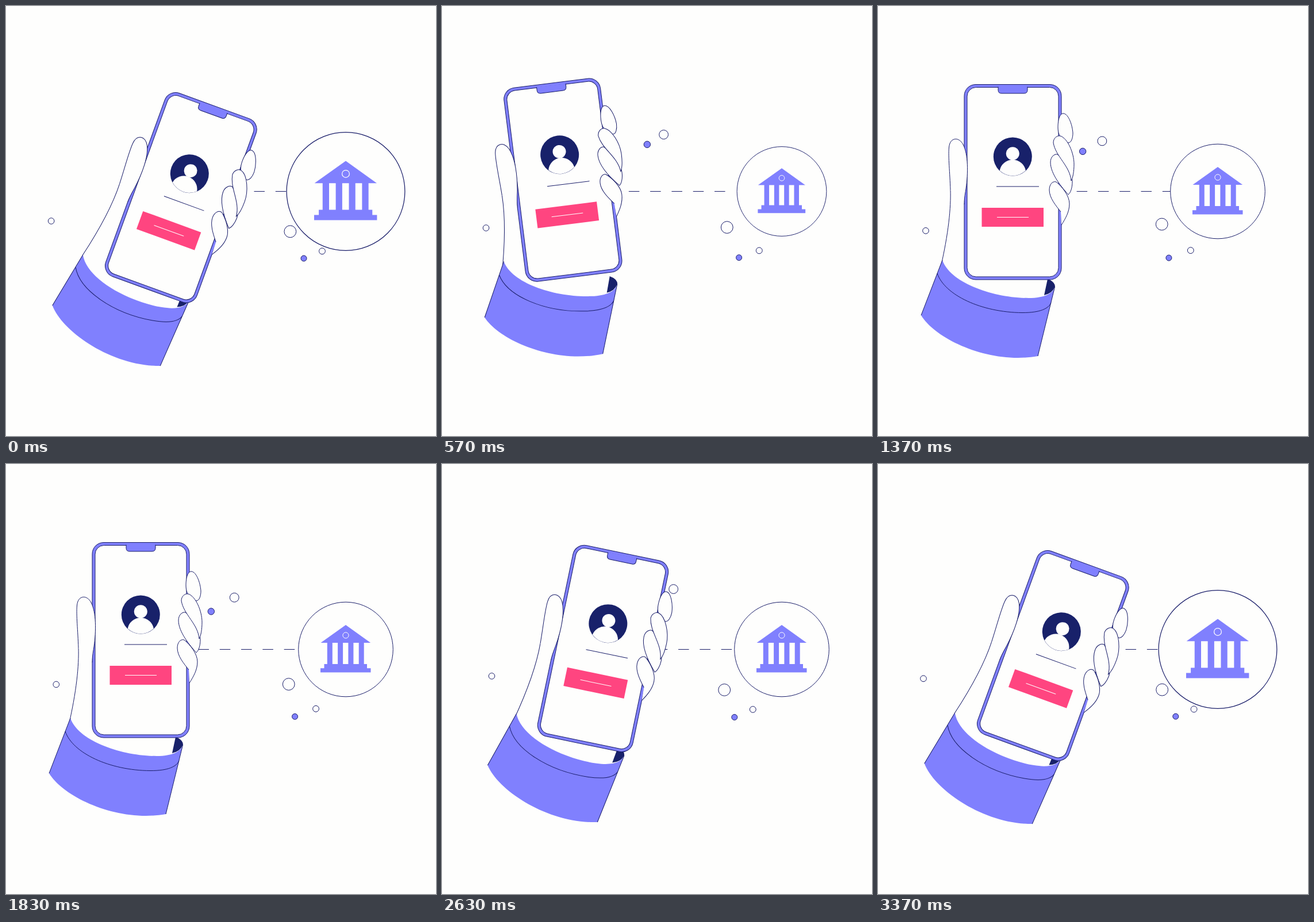
An HTML page for the animation above (3.41 s loop, 748x748 px).

```html
<!DOCTYPE html>
<html lang="en">
<head>
<meta charset="utf-8">
<title>Phone payment</title>
<style>
  html, body { margin: 0; height: 100%; overflow: hidden; background: #fefefd; }
  svg { display: block; width: 100vw; height: 100vh; }
  .line { fill: none; stroke: #191d69; }
  .white { fill: #fefefd; stroke: #191d69; }
  .violet { fill: #8080fe; stroke: #191d69; }
  .flat { fill: #8080fe; }
  .navy { fill: #18216a; }
  .blank { fill: #fefefd; }
  .chalk { fill: none; stroke: #fefefd; }
</style>
</head>
<body>
<svg viewBox="0 0 748 748">
  <path id="dashes" class="line" d="M250 322.5H510" stroke-dasharray="18.5 18.8"/>

  <g id="bank">
    <circle class="white" cx="591" cy="322.5" r="82.3"/>
    <path class="flat" d="M547.5 311 591 280 634.2 311ZM553.5 348h74.5v7.2h6.5v7.3h-87.5v-7.3h6.5z"/>
    <path stroke="#8080fe" stroke-width="39" stroke-dasharray="9 9.3" d="M558.8 329.5H622.7"/>
    <circle class="chalk" cx="591" cy="298" r="5.1"/>
  </g>

  <g id="bubbles"></g>

  <g class="held">
    <path class="line" d="M108 459C123 395 127 350 126 320"/>
  </g>

  <g id="sleeve">
    <path class="navy" d="M289 503 295 475Q308 480 307.5 489Q303 500 289 503Z"/>
    <path class="flat" d="M112 442 75 538C100 580 195 624 278 609L307.5 489C304 500 290 508 262 508C200 508 125 481 112 442Z"/>
    <path class="line" d="M112 442 75 538M278 609 307.5 489Q308 480 295 475M103 465C116 503 180 533 251 533.5C283 533.5 297 526 301 516"/>
  </g>

  <g class="held">
    <rect class="violet" x="150" y="136.5" width="169" height="339.5" rx="20"/>
    <rect class="white" x="155" y="141.5" width="159" height="329.5" rx="15.5"/>
    <path class="violet" d="M209 140.5v5.5q0 6 6 6h39q6 0 6-6v-5.5"/>
    <circle class="navy" cx="234.3" cy="262" r="33.5"/>
    <circle class="blank" cx="234.3" cy="256.7" r="11.5"/>
    <path class="blank" d="M211.7 286.3A23 23 0 0 1 256.9 286.3A33 33 0 0 1 211.7 286.3Z"/>
    <path class="line" d="M206 314H280"/>
    <rect x="180.5" y="351" width="107.5" height="33" fill="#ff4580"/>
    <path class="chalk" d="M207 367.5H262"/>

    <path class="white" d="M126 320C125 290 122 262 123.5 246C125 228 141 227 148 241C157 258 157 290 153 318C151 330 150 336 150 345"/>
    <path class="white" d="M313 211C313 196 317 186 323 187C331 188 338 206 339 221C339 230 336 238 331 238C322 236 313 228 313 211Z"/>
    <path class="white" d="M300 272C300 262 307 257 312 258C325 268 338 290 338 306C338 316 335 325 331 328C320 316 300 292 300 272Z"/>
    <path class="white" d="M305 238C305 230 311 225 317 226C330 230 341 256 341 275C341 288 339 299 336 304C334 278 309 262 305 238Z"/>
    <path class="white" d="M319 381C326 370 333 358 333 344C333 330 320 314 310 306C304 304 298 310 298 320C298 334 310 348 318 358"/>
  </g>
</svg>
<script>
  const LOOP = 3410;
  const $ = selector => document.querySelectorAll(selector);
  const [dashes] = $('#dashes'), [bank] = $('#bank'), [sleeve] = $('#sleeve'), [layer] = $('#bubbles');
  const held = $('.held');

  // Each bubble circles a centre once per loop; phase is in degrees
  const bubbles = [
    { look: 'white', r: 5.3, x: 82.5, y: 380, rx: 6, ry: 12, phase: 230 },
    { look: 'white', r: 10.4, x: 493.3, y: 387, rx: 2.5, ry: 7.5, phase: 65 },
    { look: 'violet', r: 5, x: 510.5, y: 439, rx: 8, ry: 1.5, phase: 20 },
    { look: 'white', r: 5.4, x: 545, y: 426, rx: 7, ry: 1, phase: 45 },
    { look: 'white', r: 7.9, x: 394, y: 224, rx: 9, ry: 11, phase: 262 },
    { look: 'violet', r: 5.7, x: 357.3, y: 247.5, rx: 1.2, ry: 9, phase: 308 }
  ];
  for (const bubble of bubbles) {
    bubble.node = document.createElementNS('http://www.w3.org/2000/svg', 'circle');
    bubble.node.setAttribute('class', bubble.look);
    bubble.node.setAttribute('r', bubble.r);
    layer.append(bubble.node);
  }

  const wave = (t, degrees) => Math.cos(2 * Math.PI * t / LOOP - degrees * Math.PI / 180);

  function smooth(u) {
    u = Math.min(1, Math.max(0, u));
    return u * u * (3 - 2 * u);
  }

  // Goes from 0 to 1, overshooting by `extra` before it settles
  function spring(t, begin, span, extra) {
    const u = (t - begin) / span, peak = 0.74;
    return (1 + extra) * smooth(u / peak) - extra * smooth((u - peak) / (1 - peak));
  }

  function draw(t) {
    const sleeveTurn = 10 * (1 - spring(t, 30, 650, 0.3) + spring(t, 2333, 650, 0.2));
    const wristTurn = 10 * (1 - spring(t, 97, 650, 0.5) + spring(t, 2450, 715, 0.35));
    const scale = 1.25 - 0.25 * (spring(t, 272, 523, 0.4) - spring(t, 2740, 630, 0.44));

    const arm = `rotate(${sleeveTurn} 175.5 562)`;
    const wrist = `${arm} rotate(${wristTurn} 202 471.3)`;
    sleeve.setAttribute('transform', arm);
    held.forEach(part => part.setAttribute('transform', wrist));

    bank.setAttribute('transform', `translate(591 322.5) scale(${scale}) translate(-591 -322.5)`);
    dashes.setAttribute('stroke-dashoffset', 15 - 15.5 * wave(t, 50));
    for (const { node, x, y, rx, ry, phase } of bubbles) {
      node.setAttribute('cx', x + rx * wave(t, phase));
      node.setAttribute('cy', y + ry * wave(t, phase - 110));
    }
  }

  const start = performance.now();
  function tick() {
    draw((performance.now() - start) % LOOP);
    requestAnimationFrame(tick);
  }
  tick();
</script>
</body>
</html>
```
